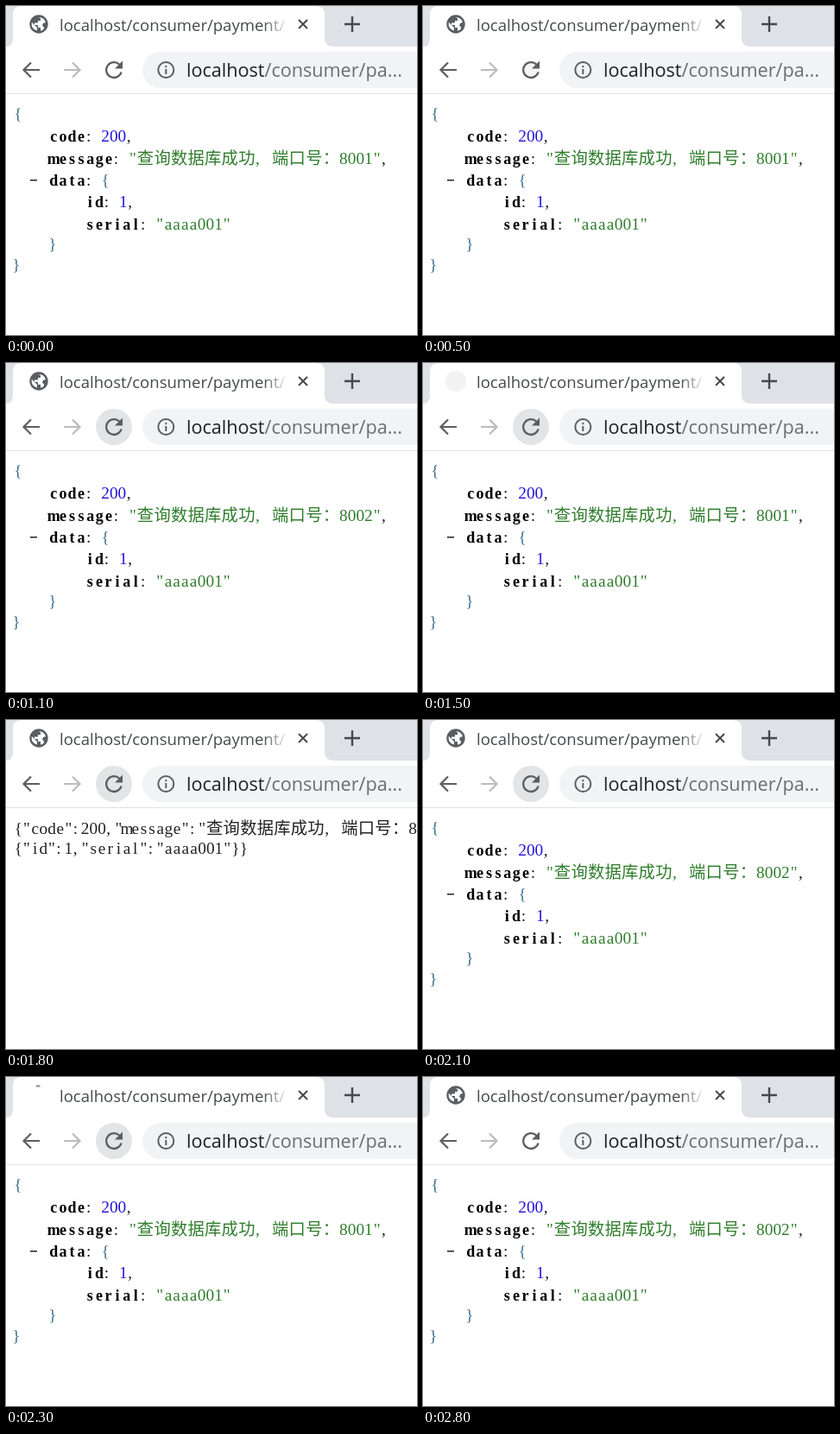
Write an HTML page with a canvas that moves like this. It is 476 by 381 pixels and loops after 3 s.

```html
<!DOCTYPE html>
<html lang="zh">
<head>
<meta charset="utf-8">
<style>
html, body { margin: 0; width: 100%; height: 100%; overflow: hidden; background: #fff; }
canvas { display: block; }
</style>
</head>
<body>
<canvas id="stage" width="476" height="381"></canvas>
<script>
const c = document.getElementById('stage').getContext('2d');
const LOOP = 3000, STEP = 100, RELOADS_FROM = 900;
const CELL = 9.67, WIDE_CELL = 19.55, BOLD_CELL = 10.6;
const GREEN = '#2f7d2c', BLUE = '#2415dc', BRACE = '#3f708f', INK = '#222', ICON = '#5a5e63';
const UI = '"Open Sans", "Noto Sans", sans-serif';

// One entry per step: port digit + tab icon (g globe, d disc, t tick), or "raw".
const reloads = '1d raw 2g 2d raw 1g 1d raw 2d raw 1d raw 2g raw 1t raw 2g'.split(' ');

function disc(x, y, r, color) {
  c.fillStyle = color;
  c.beginPath();
  c.arc(x, y, r, 0, 7);
  c.fill();
}

function stroke(d, color, width) {
  c.strokeStyle = color;
  c.lineWidth = width;
  c.stroke(new Path2D(d));
}

function fill(d, color) {
  c.fillStyle = color;
  c.fill(new Path2D(d));
}

function label(text, x, y, size, color) {
  c.font = `${size}px ${UI}`;
  c.textAlign = 'left';
  c.fillStyle = color;
  c.fillText(text, x, y);
  return x + c.measureText(text).width;
}

// Fixed-pitch text: punctuation sits left in its cell, other glyphs are centred.
function mono(text, x, y, color, bold) {
  c.fillStyle = color;
  for (const ch of text) {
    const wide = ch > '\u2fff', left = ch === ':' || ch === ',';
    const w = wide ? WIDE_CELL : bold ? BOLD_CELL : CELL;
    c.font = wide ? '300 19.3px "Noto Sans CJK SC", "Noto Sans CJK", sans-serif'
      : `${bold ? 'bold 18px' : '19.3px'} "Liberation Serif", serif`;
    c.textAlign = left ? 'left' : 'center';
    c.fillText(ch, left ? x + 0.5 : x + w / 2, y);
    x += w;
  }
  return x;
}

function pair(key, value, x, y, color, tail = '') {
  x = mono(key, x, y, '#000', true);
  x = mono(': ', x, y, INK) - 1.5;
  x = mono(value, x, y, color);
  mono(tail, x, y, INK);
}

function prettyJson(port) {
  mono('{', 9, 131, BRACE);
  pair('code', '200', 50, 157, BLUE, ',');
  pair('message', `"查询数据库成功, 端口号：${port}"`, 50, 183, GREEN, ',');
  c.fillStyle = INK;
  c.fillRect(28, 201, 8, 1.5);
  pair('data', '{', 50, 208, BRACE);
  pair('id', '1', 92, 233, BLUE, ',');
  pair('serial', '"aaaa001"', 92, 259, GREEN);
  mono('}', 49, 282, BRACE);
  mono('}', 7, 306, BRACE);
}

function rawJson() {
  mono('{"code":200,"message":"查询数据库成功, 端口号：8001","data":', 9.5, 132, INK);
  mono('{"id":1,"serial":"aaaa001"}}', 9.5, 155, INK);
}

function globe() {
  disc(38, 21, 10.7, ICON);
  fill('M30 19 L36 25 V28.5 Q29 27 29.7 19Z M38 13 Q44 13 46 19 L43 20 L42 23 Q45 24 43.5 27 Q41 29 40 28.5 V25 H37 V22 H33 V19.5 H37 V17 H40 V14.5Z', '#fff');
}

function tab(icon) {
  c.fillStyle = '#dee1e6';
  c.fillRect(0, 0, 476, 47);
  fill('M0 47 Q8 47 8 37 V10 Q8 0 18 0 H359 Q369 0 369 10 V37 Q369 47 380 47Z', '#fff');
  if (icon === 'g') globe();
  else if (icon === 'd') disc(38, 21, 12, '#f2f2f3');
  else stroke('M35 10.5 H39.5', '#85898d', 2);

  const fade = c.createLinearGradient(298, 0, 327, 0);
  fade.addColorStop(0, '#45484c');
  fade.addColorStop(1, '#45484c00');
  label('localhost/consumer/payment/', 62, 29, 18.5, fade);
  stroke('M339 16 L349 26 M349 16 L339 26', '#45494d', 2);
  stroke('M392 21 H410 M401 12 V30', '#45494d', 2.4);
}

function toolbar(hover) {
  stroke('M39 74 H21 M29 65.5 L20.5 74 L29 82.5', ICON, 2.2);
  stroke('M67 74 H85 M77 65.5 L85.5 74 L77 82.5', '#babcbe', 2.2);
  if (hover) disc(125, 74, hover, hover < 20 ? '#f4f4f5' : '#e3e4e5');
  stroke('M131.4 67.8 A8.9 8.9 0 1 0 133.6 76.5', ICON, 2.3);
  fill('M135 63.5 V72.5 H126Z', ICON);

  fill('M476 53 H179 A21 21 0 0 0 179 95 H476Z', '#f1f3f4');
  stroke('M194.3 74 A9 9 0 1 1 176.3 74 A9 9 0 1 1 194.3 74 M185.3 73 V79 M185.3 69 V71.2', ICON, 2);
  const x = label('localhost', 209, 82, 21.6, '#202124');
  label('/consumer/pa...', x, 82, 21.6, '#6a6e73');
  c.fillStyle = '#dfe1e4';
  c.fillRect(0, 101, 476, 1);
}

function draw(now) {
  const t = now % LOOP;
  const step = Math.floor((t - RELOADS_FROM) / STEP);
  const state = step < 0 ? '1g' : reloads[Math.min(step, reloads.length - 1)];
  const raw = state === 'raw';
  const hover = t < 500 || t >= 2800 ? 0 : t < RELOADS_FROM ? 10.5 : 21;

  c.fillStyle = '#fff';
  c.fillRect(0, 0, 476, 381);
  tab(raw ? 'g' : state[1]);
  toolbar(hover);
  if (raw) rawJson();
  else prettyJson('800' + state[0]);
}

const start = performance.now();
function loop() {
  draw(performance.now() - start);
  requestAnimationFrame(loop);
}
loop();
</script>
</body>
</html>
```
